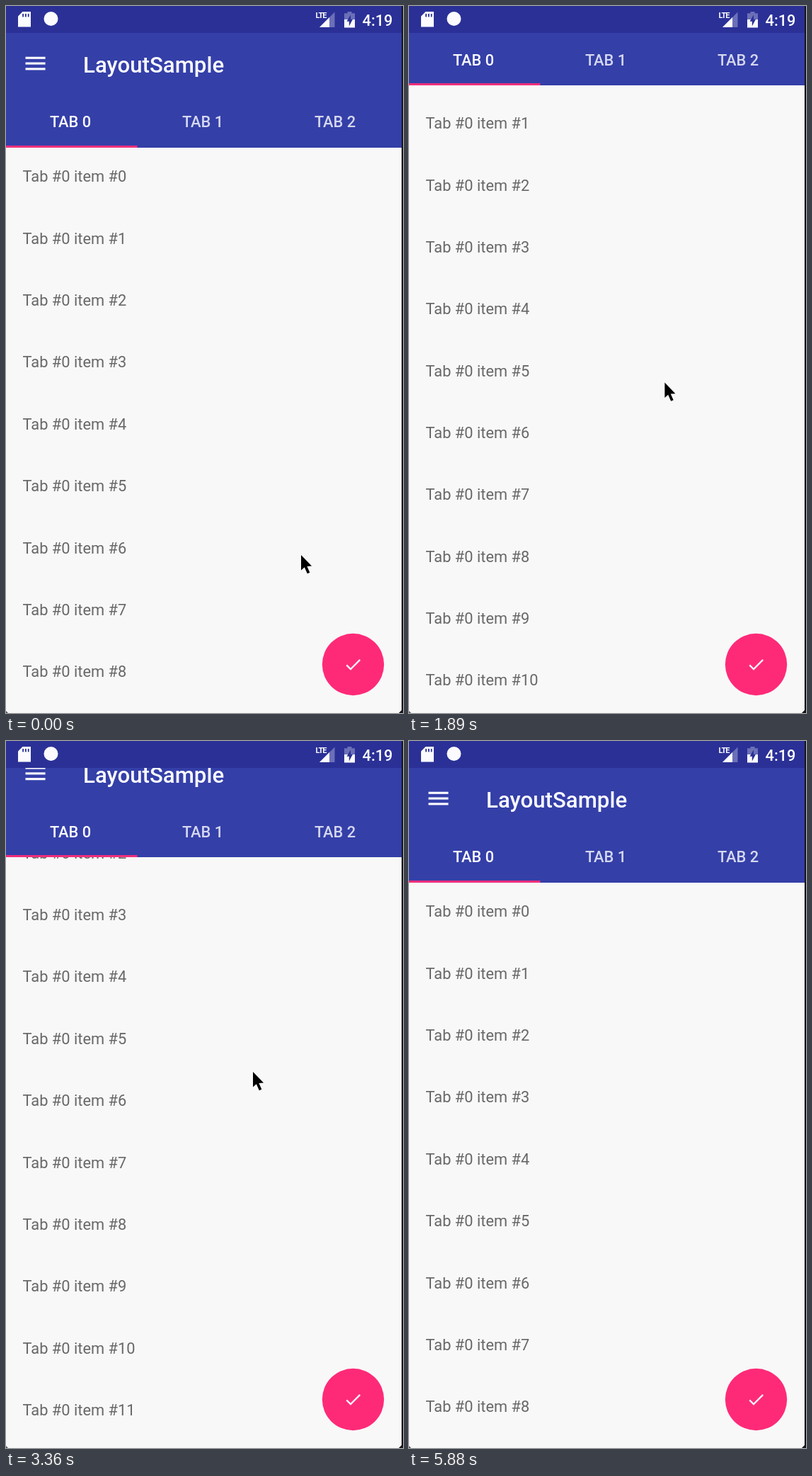
Recreate the animation shown at these times as an HTML page with a canvas. Size 561 by 998 pixels, loop 5.95 s.

```html
<!DOCTYPE html>
<html lang="en">
<head>
<meta charset="utf-8">
<title>Scrolling tabs</title>
<style>
  html, body { margin: 0; width: 100%; height: 100%; overflow: hidden; background: #f8f8f8; }
  canvas { display: block; width: 561px; height: 998px; }
</style>
</head>
<body>
<canvas id="stage" width="561" height="998"></canvas>
<script>
const ctx = document.getElementById('stage').getContext('2d');
const W = 561, H = 998, EDGE = 559;
const LOOP = 5950, STEP = 70;
const DP = 1.56, ROW = 56 * DP, STATUS = 38, HEADER_BOTTOM = 199.6;
const MAX_SCROLL = 222.2;
const INDIGO = '#343fa8', DARK = '#2a3096', FAINT = '#6b70b8', PINK = '#fe2a78', WHITE = '#fbfbff';

// 0 before a, 1 after b, straight line between
const ramp = (t, a, b) => Math.min(1, Math.max(0, (t - a) / (b - a)));

// The toolbar slides away first, then the list scrolls; the way back does the same.
const headerShift = t => ROW * (ramp(t, 700, 1190) - ramp(t, 3080, 3549));
const listScroll = t => MAX_SCROLL * (ramp(t, 1540, 2574) - ramp(t, 3480, 3790) ** 1.4);
const glowLevel = t => ramp(t, 3780, 3850) * (1 - ramp(t, 3920, 4340));

// Turning points of the pointer: time, x, y
const stops = [
  [0, 417, 775], [700, 395, 525], [1260, 384, 422], [1540, 370, 607], [2310, 351, 441],
  [2590, 350, 388], [3080, 349, 415], [3360, 349, 467], [3640, 357, 549],
  [3920, 357, 549], [5040, 446, 779], [5740, 563, 800]
];

function pointer(t) {
  const k = Math.max(1, stops.findIndex(s => t <= s[0]));
  const from = stops[k - 1], to = stops[k];
  const u = ramp(t, from[0], to[0]);
  return t > LOOP - 210 ? [W + 10, H] : [1, 2].map(i => from[i] + (to[i] - from[i]) * u);
}

function rect(color, x, y, w, h) {
  ctx.fillStyle = color;
  ctx.fillRect(x, y, w, h);
}

function poly(color, ...pts) {
  ctx.fillStyle = color;
  ctx.beginPath();
  pts.forEach(([x, y]) => ctx.lineTo(x, y));
  ctx.closePath();
  ctx.fill();
}

function disc(color, x, y, r) {
  ctx.fillStyle = color;
  ctx.beginPath();
  ctx.arc(x, y, r, 0, Math.PI * 2);
  ctx.fill();
}

function text(str, x, y, color, weight = 500, size = 14 * DP) {
  ctx.font = `${weight} ${size}px Roboto, sans-serif`;
  ctx.fillStyle = color;
  ctx.fillText(str, x, Math.round(y));
}

function at(x, y, scale, paint) {
  ctx.save();
  ctx.translate(x, y);
  ctx.scale(scale, scale);
  paint();
  ctx.restore();
}

function drawList(shift, scroll) {
  for (let i = 0; i < 14; i++) {
    text(`Tab #0 item #${i}`, 23.5, 248.4 + i * ROW - shift - scroll, '#686868', 400);
  }
}

function drawHeader(shift, glow) {
  const bottom = Math.round(HEADER_BOTTOM - shift);
  if (glow > 0) {
    const g = ctx.createLinearGradient(0, bottom, 0, bottom + 6);
    g.addColorStop(0, `rgba(110,112,150,${0.7 * glow})`);
    g.addColorStop(0.7, `rgba(150,155,205,${0.6 * glow})`);
    g.addColorStop(1, 'rgba(170,175,220,0)');
    rect(g, 0, bottom, W, 6);
  }
  rect(INDIGO, 0, 0, W, bottom);
  for (let i = -1; i < 2; i++) rect(WHITE, 27.5, 79.5 + i * 5 * DP - shift, 18 * DP, 2 * DP);
  text('LayoutSample', 109, 94 - shift, WHITE, 500, 20 * DP);
  for (let i = 0; i < 3; i++) {
    text(`TAB ${i}`, 62 + i * 187, 171 - shift, i ? '#d5d8ef' : WHITE);
  }
  rect('#ee2e7c', 0, bottom - 3, 185.5, 3);
}

function drawStatus() {
  rect(DARK, 0, 0, W, STATUS);
  // memory card
  poly(WHITE, [23.5, 8], [35, 8], [35, 29.5], [17, 29.5], [17, 14.5]);
  for (let i = 0; i < 3; i++) rect(DARK, 23.2 + i * 3.8, 11, 1.8, 4.4);
  disc(WHITE, 63.5, 18, 10);
  // signal
  poly(FAINT, [443, 30], [464.5, 30], [464.5, 8.5]);
  poly(WHITE, [443, 30], [457, 30], [457, 16]);
  rect(DARK, 436, 7, 18, 11);
  ctx.letterSpacing = '-0.9px';
  text('LTE', 437.5, 17, WHITE, 700, 11);
  ctx.letterSpacing = '0px';
  // battery
  rect(FAINT, 482.5, 8, 6, 3);
  rect(FAINT, 478, 10.3, 15, 9);
  rect(WHITE, 478, 19, 15, 11.5);
  poly(DARK, [487, 12.5], [481.5, 21.8], [484.8, 21.8], [484.8, 28.5], [490, 18.8], [487, 18.8]);
  text('4:19', 503.5, 27.5, WHITE);
}

function drawButton() {
  disc(PINK, 490.5, 929.5, 28 * DP);
  at(490.5, 929.5, 0.75 * DP, () =>
    poly('#fff4f8', [-3, 4.2], [-7.2, 0], [-8.6, 1.4], [-3, 7], [9, -5], [7.6, -6.4]));
}

function drawPointer([x, y]) {
  at(x, y, 1, () => {
    poly('#000', [0, 0], [0, 21.5], [4.8, 17.2], [8.8, 26.3], [12.3, 24.8], [8.4, 15.9], [15, 15.6]);
    ctx.globalCompositeOperation = 'destination-over';
  });
}

function drawFrameEdge() {
  rect('#15151a', EDGE, 0, W - EDGE, H);
  poly('#15151a', [EDGE, H - 4], [EDGE, H], [EDGE - 4, H]);
  poly('#55555a', [0, H - 3], [0, H], [3, H]);
}

function draw(t) {
  const shift = headerShift(t), glow = glowLevel(t);
  rect(glow > 0 ? '#f8faf9' : '#f8f8f8', 0, 0, W, H);
  drawList(shift, listScroll(t));
  drawHeader(shift, glow);
  drawStatus();
  drawButton();
  drawPointer(pointer(t));
  drawFrameEdge();
}

const start = performance.now();
function tick(now) {
  const t = Math.max(0, now - start) % LOOP;
  draw(Math.floor(t / STEP) * STEP);
  requestAnimationFrame(tick);
}
draw(0);
requestAnimationFrame(tick);
</script>
</body>
</html>
```
